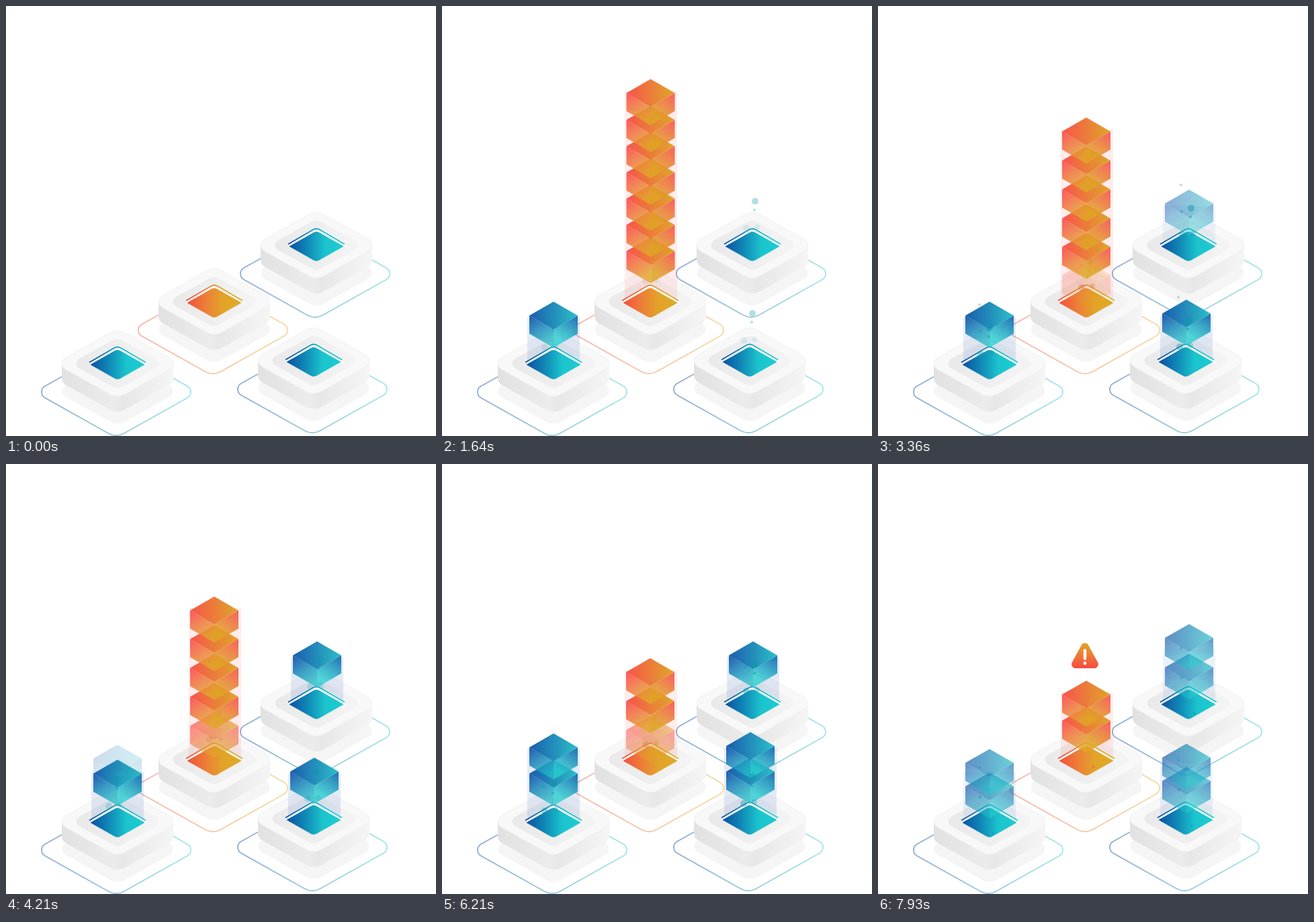
These frames come from a looping animation (640 by 640 pixels, 8 s). An HTML page with a canvas:

```html
<!DOCTYPE html>
<html lang="en">
<head>
<meta charset="utf-8">
<title>Isometric stacks</title>
<style>
  html, body { margin: 0; width: 100%; height: 100%; overflow: hidden; background: #fff; }
  canvas { display: block; width: 640px; height: 640px; }
</style>
</head>
<body>
<canvas id="stage" width="640" height="640"></canvas>
<script>
const ctx = document.getElementById('stage').getContext('2d');
const LOOP = 8000;

const warm = {
  ring: ['#f7b3a8', '#f4d9a2'],
  tile: ['#f5503f', '#ed7d38', '#e2a428', '#dfaa24'],
  top: ['#f7544a', '#dfa52a'],
  left: ['rgba(253,84,92,.97)', 'rgba(224,168,40,.8)'],
  right: ['rgba(251,84,94,.97)', 'rgba(222,166,34,.85)'],
  beam: 'rgba(255,70,80,.1)',
  bubble: '#cf6a3a'
};
const cool = {
  ring: ['#8eacd2', '#a2e6ea'],
  tile: ['#0b52a4', '#1087b6', '#1bc4cd', '#1dcbd2'],
  top: ['#1a5cad', '#2cbfc8'],
  left: ['rgba(30,88,174,.97)', 'rgba(34,190,200,.75)'],
  right: ['rgba(26,98,174,.97)', 'rgba(40,208,208,.78)'],
  beam: 'rgba(50,100,190,.13)',
  bubble: '#0f97ab'
};

const source = { x: 310, y: 440, look: warm, shift: [2, -5] };
// cubes: resting top, time of arrival, final drop
const nodes = [
  { x: 462, y: 356, cx: 463, look: cool, shift: [0, 0], cubes: [[264, 3092, 58], [225, 6300, 42]] },
  { x: 166, y: 532, cx: 166, look: cool, shift: [-4, 2], cubes: [[440, 1005, 61], [401, 4095, 74]] },
  { x: 458, y: 528, cx: 459, look: cool, shift: [0, -5], cubes: [[437, 2070, 45], [399, 5180, 55]] }
];

const STACK = 8, FALL_TIME = 650, FALL_LAG = 45;
const fallStarts = [743, 1835, 2854, 3853, 4930, 5806, 7690];

// x, y, radius, birth and life in cycles, rise per cycle, opacity
const BUBBLE_CYCLE = 2650;
const bubbles = [
  [4, -50, 5, .1, .6, 30, .48],
  [3, -37, 2, .1, .6, 30, .5],
  [-9, -11, 5, .1, .55, 28, .4],
  [7, -15, 4, .15, .5, 25, .3],
  [-10, -27, 2, .75, .75, 45, .5],
  [-11, -76, 2, .75, .6, 26, .45],
  [9, 17, 2, .8, .4, 8, .5]
];

const clamp = v => Math.min(1, Math.max(0, v));
const ease = u => u * u * (3 - 2 * u);

function gradient(x1, y1, x2, y2, stops) {
  const g = ctx.createLinearGradient(x1, y1, x2, y2);
  stops.forEach((s, i) => g.addColorStop(i / (stops.length - 1), s));
  return g;
}

function poly(points, fill) {
  ctx.beginPath();
  points.forEach(p => ctx.lineTo(...p));
  ctx.closePath();
  ctx.fillStyle = fill;
  ctx.fill();
}

// Diamond with separate rounding for its side and its top and bottom corners
function diamond(x, y, w, h, sideR, endR) {
  ctx.beginPath();
  ctx.moveTo(x - w / 2, y - h / 2);
  ctx.arcTo(x, y - h, x + w / 2, y - h / 2, endR);
  ctx.arcTo(x + w, y, x + w / 2, y + h / 2, sideR);
  ctx.arcTo(x, y + h, x - w / 2, y + h / 2, endR);
  ctx.arcTo(x - w, y, x - w / 2, y - h / 2, sideR);
  ctx.closePath();
}

function roof(y, w, h, style, width, tail = 0) {
  ctx.beginPath();
  ctx.moveTo(-w, y + h);
  ctx.arcTo(0, y, w, y + h, 10);
  ctx.lineTo(w + tail, y + h + tail * .55);
  ctx.lineWidth = width;
  ctx.strokeStyle = style;
  ctx.stroke();
}

function platform({ x, y, look }) {
  const slab = level => diamond(0, level, 93, 52, 10, 24);
  ctx.save();
  ctx.translate(x, y);
  diamond(-2, 42.5, 121.5, 68, 10, 24);
  ctx.lineWidth = 1.8;
  ctx.strokeStyle = gradient(-114, 0, 110, 0, look.ring);
  ctx.stroke();

  slab(41);
  ctx.fillStyle = '#f5f5f5';
  ctx.fill();

  const side = ctx.createLinearGradient(-83, 0, 83, 0);
  [[0, '#e1e1e1'], [.46, '#ececec'], [.54, '#e7e7e7'], [1, '#f5f5f5']]
    .forEach(s => side.addColorStop(...s));
  ctx.fillStyle = side;
  slab(23);
  ctx.fill();
  ctx.fillRect(-83, 0, 166, 23);

  slab(0);
  ctx.fillStyle = '#f8f8f8';
  ctx.fill();
  ctx.lineWidth = 1;
  ctx.strokeStyle = '#f1f1f1';
  ctx.stroke();

  diamond(0, 0, 70, 38.5, 8, 16);
  ctx.fillStyle = gradient(-62, 0, 62, 0, ['#e9e9e9', '#f4f4f4']);
  ctx.fill();

  const paint = gradient(-40, 0, 40, 0, look.tile);
  roof(-23, 41, 23.5, '#f7f7f7', 3, 5);
  roof(-26, 42, 24.5, paint, 1.8);
  diamond(0, 1.7, 40.5, 23, .5, 9);
  ctx.fillStyle = paint;
  ctx.fill();
  ctx.restore();
}

function cube(x, y, look, alpha) {
  if (alpha <= 0) return;
  const w = 36, h = 20.7, d = 27;
  ctx.save();
  ctx.globalAlpha = alpha;
  ctx.translate(x, y + h);
  poly([[-w, 0], [0, h], [0, h + d], [-w, d]], gradient(-w, 2, -8, h + d - 6, look.left));
  poly([[w, 0], [0, h], [0, h + d], [w, d]], gradient(w, -2, 10, h + 16, look.right));
  poly([[0, -h], [w, 0], [0, h], [-w, 0]], gradient(-w, 0, w, 0, look.top));
  ctx.restore();
}

function beam(x, top, base, look, alpha) {
  if (alpha <= 0) return;
  ctx.globalAlpha = alpha;
  poly([[x - 39, top], [x + 39, top], [x + 39, base - 4], [x, base - 26], [x - 39, base - 4]], look.beam);
  ctx.globalAlpha = 1;
}

function bubbleField({ x, y, look, shift }, t) {
  ctx.fillStyle = look.bubble;
  for (const [dx, dy, r, birth, life, rise, opacity] of bubbles) {
    for (let cycle = 0; cycle < 4; cycle++) {
      const age = t / BUBBLE_CYCLE - cycle - birth;
      if (age <= 0 || age >= life) continue;
      ctx.globalAlpha = opacity * Math.min(1, 1.6 * Math.sin(Math.PI * age / life));
      ctx.beginPath();
      ctx.arc(x + dx + shift[0], y + dy + shift[1] - rise * age, r, 0, 2 * Math.PI);
      ctx.fill();
    }
  }
  ctx.globalAlpha = 1;
}

function stackCube(i, t) {
  const intro = clamp(t / 500);
  let x = 311, y = 70 + 39 * i + 10 * (1 - ease(intro)), alpha = intro;
  fallStarts.forEach((start, n) => {
    const above = STACK - 1 - n - i;
    if (above < 0) return;
    const lag = n < 6 ? FALL_LAG * above : 0;
    const u = clamp((t - start - lag) / FALL_TIME);
    y += 40 * ease(u);
    x -= .5 * ease(u);
    if (above === 0) alpha *= 1 - clamp((u - .4) / .5);
  });
  return { x: Math.max(310, x), y, alpha };
}

function sourceStack(t) {
  const top = stackCube(0, t);
  beam(311, top.y + 18, source.y, warm, top.alpha);
  bubbleField(source, t);
  for (let i = STACK - 1; i >= 0; i--) {
    const c = stackCube(i, t);
    cube(c.x, c.y, warm, c.alpha);
  }
}

function nodeStack(node, t) {
  const sink = clamp((t - 7700) / 620);
  const cubes = node.cubes.map(([rest, start, drop]) => {
    const u = clamp((t - start) / 530);
    return { y: rest + 19 * (1 - ease(u)) + drop * ease(sink), alpha: u * (1 - .8 * sink) };
  });
  const [low, high] = cubes;
  const top = low.y + (high.y - low.y) * high.alpha;
  beam(node.cx, top + 24, node.y, cool, low.alpha);
  cubes.forEach(c => cube(node.cx, c.y, cool, c.alpha));
  bubbleField(node, t);
}

function alertSign(t) {
  const u = clamp((t - 6900) / 450);
  if (!u) return;
  ctx.save();
  ctx.globalAlpha = u;
  ctx.translate(308, 265 - 14 * (1 - ease(u)));
  ctx.beginPath();
  ctx.moveTo(0, 39);
  ctx.arcTo(-24, 39, 0, -5, 6);
  ctx.arcTo(0, -5, 24, 39, 6);
  ctx.arcTo(24, 39, 0, 39, 6);
  ctx.closePath();
  ctx.fillStyle = gradient(0, 0, 0, 39, ['#dfa826', '#ee7a35', '#f84a40']);
  ctx.fill();
  ctx.strokeStyle = ctx.fillStyle = '#fff';
  ctx.lineWidth = 4.4;
  ctx.lineCap = 'round';
  ctx.beginPath();
  ctx.moveTo(0, 12.5);
  ctx.lineTo(0, 24.5);
  ctx.stroke();
  ctx.beginPath();
  ctx.arc(0, 31.5, 2.4, 0, 2 * Math.PI);
  ctx.fill();
  ctx.restore();
}

function draw(t) {
  ctx.fillStyle = '#fff';
  ctx.fillRect(0, 0, 640, 640);
  [nodes[0], source, nodes[1], nodes[2]].forEach(platform);
  sourceStack(t);
  nodes.forEach(n => nodeStack(n, t));
  alertSign(t);
}

const begin = performance.now();
function tick() {
  const t = (performance.now() - begin) % LOOP;
  draw(t < 70 ? 0 : t);
  requestAnimationFrame(tick);
}
tick();
</script>
</body>
</html>
```
